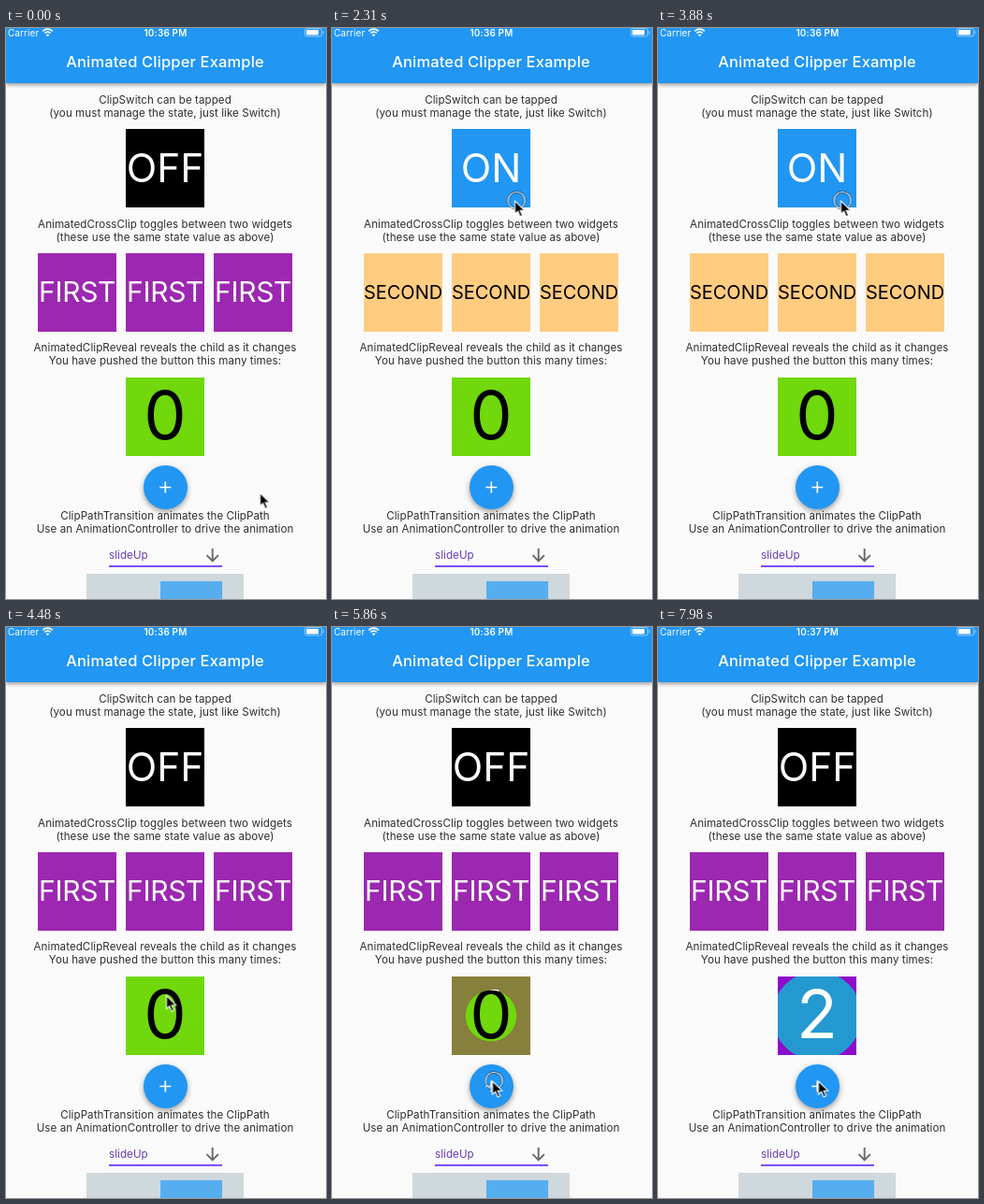
Write an HTML page that moves like this. It is 342 by 611 pixels and loops after 8 s.

```html
<!DOCTYPE html>
<html lang="en">
<head>
<meta charset="utf-8">
<title>Animated Clipper Example</title>
<style>
  @property --open { syntax: "<number>"; inherits: false; initial-value: 0; }

  html, body { margin: 0; width: 100%; height: 100%; overflow: hidden; }
  body { background: #fafafa; }
  #stage {
    position: relative; width: 342px; height: 611px; overflow: hidden;
    background: #fafafa; color: rgba(0, 0, 0, .82);
    font: 400 11.57px/14px Inter, Roboto, sans-serif;
    letter-spacing: .075px; white-space: pre;
  }
  #stage > * { position: absolute; }

  /* Header */
  .bar { left: 0; top: 0; width: 342px; height: 59px; background: #2196f3; box-shadow: 0 1.5px 4px rgba(0, 0, 0, .38); }
  .title { left: 0; top: 26px; width: 340px; line-height: 20px; text-align: center; color: #fff; font-size: 16.5px; font-weight: 500; letter-spacing: .15px; }
  .status { top: -2px; color: #fff; font-size: 9.9px; letter-spacing: .15px; }
  .clock { left: 0; width: 341px; text-align: center; font-weight: 600; letter-spacing: .2px; }
  .early { animation: early 8s step-end infinite; }
  .late { animation: late 8s step-end infinite; }
  @keyframes early { 0% { opacity: 1 } 80%, 100% { opacity: 0 } }
  @keyframes late { 0% { opacity: 0 } 80%, 100% { opacity: 1 } }

  .note { left: 0; width: 340px; margin: 0; text-align: center; }

  /* Square tiles with stacked faces */
  .tile { width: 84px; height: 84px; }
  .tile > div {
    position: absolute; inset: 0; display: flex; align-items: center; justify-content: center;
    box-sizing: border-box; color: #fff; letter-spacing: 0; line-height: 1;
  }
  .first { background: #9c27b0; font-size: 30px; padding-bottom: 2px; }
  .tile > .first { letter-spacing: -.3px; }
  .tile > .second { background: #ffcc80; color: #000; font-size: 20px; }
  .off, .on { background: #000; font-size: 42.5px; }
  .on { background: #2196f3; }

  .on, .second { animation: toggle 8s linear infinite; }
  .second { animation-timing-function: ease-in-out; --gap: calc((1 - var(--open)) * 50%); }
  .on { clip-path: inset(calc((1 - var(--open)) * 100%) 0 0 0); }
  .rows { clip-path: inset(var(--gap) 0); }
  .cols { clip-path: inset(0 var(--gap)); }
  .disc { clip-path: circle(calc(var(--open) * 59.4px)); }
  @keyframes toggle {
    0%, 15.675%, 35%, 41.125%, 53.0625%, 100% { --open: 0 }
    19.425%, 31.25%, 44.875%, 49.3125% { --open: 1 }
  }

  /* Counter: each older face shrinks away over the next one */
  .count { font-size: 72px; padding-bottom: 5px; }
  .n3 { background: #8f0bcb; }
  .n2 { background: #2499d0; animation: leave2 8s linear infinite; }
  .n1 { background: #877f3c; animation: leave1 8s ease-out infinite; }
  .tile > .n0 { background: #70d80b; color: #000; animation: leave0 8s ease-out infinite; }
  @keyframes leave0 { 0%, 65.75% { clip-path: circle(59.4px) } 85.75%, 100% { clip-path: circle(0px) } }
  @keyframes leave1 { 0%, 80% { clip-path: circle(59.4px) } 100% { clip-path: circle(0px) } }
  @keyframes leave2 { 0%, 97.24% { clip-path: circle(59.4px) } 100% { clip-path: circle(46.5px) } }

  /* Round button */
  .fab {
    left: 147px; top: 468px; width: 47px; height: 47px; border-radius: 50%; background: #2196f3;
    animation: lift 8s linear infinite;
  }
  .fab svg { position: absolute; inset: 0; }
  @keyframes lift {
    0%, 73%, 81.5%, 100% { box-shadow: 0 3px 5px rgba(0, 0, 0, .28), 0 1px 8px rgba(0, 0, 0, .12) }
    74.5%, 80% { box-shadow: 0 5px 9px rgba(0, 0, 0, .2), 0 2px 16px rgba(0, 0, 0, .1) }
  }

  /* Picker and lower panel */
  .pick { left: 110px; top: 557px; color: #673ab7; }
  .line { left: 110px; top: 575px; width: 121px; height: 1.7px; background: #7c4dff; }
  .panel { left: 86px; top: 584px; width: 168px; height: 27px; background: #cfd8dc; }
  .mark { left: 165px; top: 592px; width: 66px; height: 66px; background: #57aeef; }

  /* Pointer */
  .pointer { left: 0; top: 0; overflow: visible; animation: roam 8s linear infinite; }
  .ring { animation: press 8s step-end infinite; }
  @keyframes roam {
    0%, 1.5% { transform: translate(271.5px, 497.5px) }
    2.6% { transform: translate(281px, 462px) }
    4% { transform: translate(286px, 398px) }
    5.5% { transform: translate(272px, 306px) }
    7% { transform: translate(236px, 218px) }
    8.2% { transform: translate(208px, 171px) }
    9.25%, 21.5% { transform: translate(197.5px, 155.5px) }
    24%, 53.1% { transform: translate(195.5px, 185px) }
    54.5% { transform: translate(187px, 283px) }
    56% { transform: translate(171.5px, 394px) }
    58% { transform: translate(166px, 455px) }
    60% { transform: translate(166px, 478px) }
    61.4% { transform: translate(175.5px, 486px) }
    63%, 100% { transform: translate(171.5px, 486px) }
  }
  @keyframes press {
    0%, 15.675%, 31.1%, 41.125%, 49.31%, 65.75%, 79.9%, 97.1%, 100% { opacity: 0 }
    14.125%, 28.875%, 40%, 47.75%, 63.9%, 72.5%, 96.1% { opacity: 1 }
  }
</style>
</head>
<body>
<div id="stage">
  <div class="bar"></div>
  <div class="status" style="left:2px">Carrier</div>
  <div class="status clock early">10:36 PM</div>
  <div class="status clock late">10:37 PM</div>
  <svg width="342" height="12" fill="none" stroke="#fff" style="left:0;top:0">
    <path d="M39.2 3.3Q44.5-1.2 49.8 3.3M41.2 5.5Q44.5 2.7 47.8 5.5" stroke-width="1.6"/>
    <path d="M42.6 7.2Q44.5 5.6 46.4 7.2L44.5 9.2Z" fill="#fff" stroke="none"/>
    <rect x="319.5" y=".5" width="18" height="8.5" rx="2" stroke-opacity=".5"/>
    <rect x="321" y="2" width="13" height="5.5" rx="1" fill="#fff" stroke="none"/>
    <path d="M339.3 3.3v3" stroke-opacity=".5"/>
  </svg>
  <div class="title">Animated Clipper Example</div>

  <p class="note" style="top:70px">ClipSwitch can be tapped
(you must manage the state, just like Switch)</p>
  <div class="tile" style="left:128px;top:108px">
    <div class="off">OFF</div>
    <div class="on">ON</div>
  </div>

  <p class="note" style="top:202.5px">AnimatedCrossClip toggles between two widgets
(these use the same state value as above)</p>
  <div class="tile" style="left:34px;top:241px">
    <div class="first">FIRST</div>
    <div class="second rows">SECOND</div>
  </div>
  <div class="tile" style="left:128px;top:241px">
    <div class="first">FIRST</div>
    <div class="second cols">SECOND</div>
  </div>
  <div class="tile" style="left:222px;top:241px">
    <div class="first">FIRST</div>
    <div class="second disc">SECOND</div>
  </div>

  <p class="note" style="top:335px">AnimatedClipReveal reveals the child as it changes
You have pushed the button this many times:</p>
  <div class="tile" style="left:128px;top:374px">
    <div class="count n3">3</div>
    <div class="count n2">2</div>
    <div class="count n1">1</div>
    <div class="count n0">0</div>
  </div>

  <div class="fab">
    <svg width="47" height="47" stroke="#fff" stroke-width="1.7"><path d="M17.3 23.5h12M23.3 17.5v12"/></svg>
  </div>

  <p class="note" style="top:515px">ClipPathTransition animates the ClipPath
Use an AnimationController to drive the animation</p>
  <div class="pick">slideUp</div>
  <svg width="20" height="20" fill="none" stroke="#686868" stroke-width="1.9" style="left:211px;top:554px">
    <path d="M9.7 3V16M3.5 10.2L9.7 16.4L15.9 10.2"/>
  </svg>
  <div class="line"></div>
  <div class="panel"></div>
  <div class="mark"></div>

  <svg class="pointer" width="1" height="1">
    <g class="ring" fill="none">
      <circle cx="1.7" cy="-.5" r="9" stroke="#000" stroke-opacity=".6" stroke-width="2.4"/>
      <circle cx="1.7" cy="-.5" r="9" stroke="#fff" stroke-width="1.2"/>
    </g>
    <path d="M0 0V14.2L3.2 11.2L5.6 16.8L8.1 15.7L5.7 10.2H10.2Z" fill="#000" stroke="#fff" stroke-width="1.1"/>
  </svg>
</div>
</body>
</html>
```
